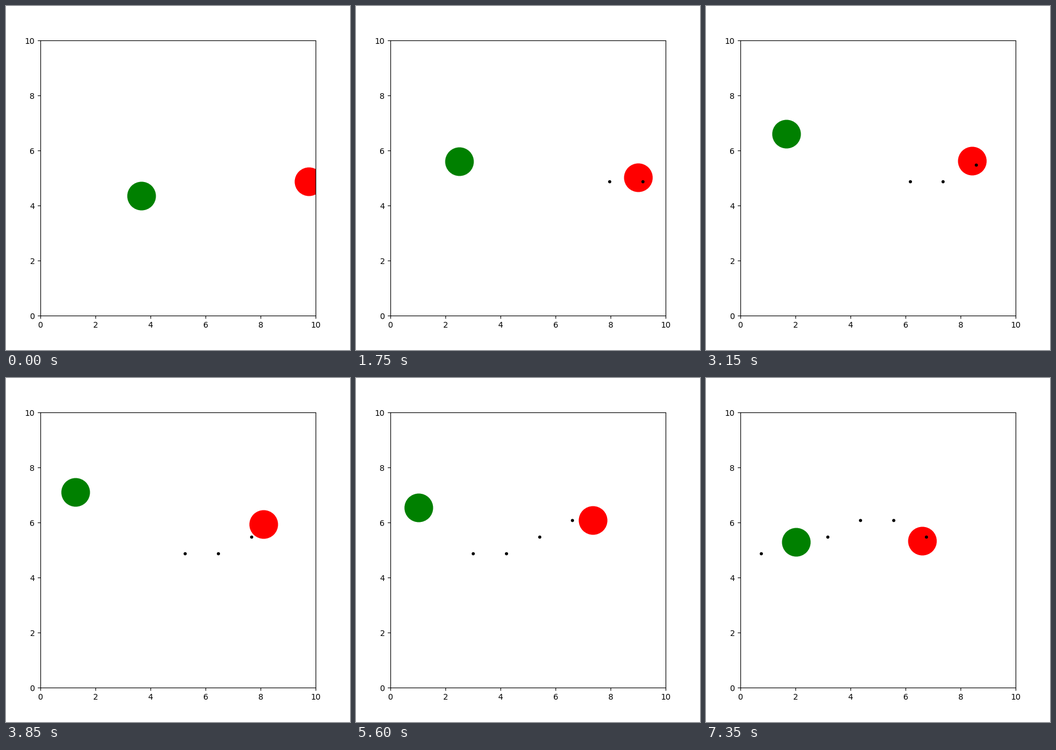
Animation, 600 px wide and 600 px high, one loop 7700 ms. Source, as a matplotlib script:

```python
import numpy as np
import matplotlib.pyplot as plt
from matplotlib.animation import FuncAnimation

FRAMES, INTERVAL = 22, 350
STEP, CLIMB, SHOT_STEP = 0.15, 0.25, 0.45
RELOAD = 4
HIT_RANGE = 0.5
START = np.array([9.758, 4.879])
CEILING = 7.292


def green_pos(k):
    """Climb to the ceiling, then sink, while swerving left and back."""
    x = np.interp(k, [0, 3, 7, 11, 13, 15, 18, 21],
                  [3.667, 2.938, 2.063, 1.271, 1.188, 0.834, 1.396, 2.020])
    y = min(4.355 + CLIMB * k, CEILING, CEILING - CLIMB * (k - 13))
    return np.array([x, y])


def red_pos(k):
    """Drift left at a steady pace, zigzagging down, up and down."""
    rise = np.interp(k, [0, 2, 14, 21], [0, -2, 10, 3])
    return START + STEP * np.array([-k, rise])


def shot_pos(fired, k):
    """Leave from where red fired and fly straight left."""
    return red_pos(fired) - [SHOT_STEP * (k - fired - 1), 0]


def live_shots(k):
    shots = [shot_pos(fired, k) for fired in range(0, k, RELOAD)]
    return [s for s in shots if np.hypot(*(s - green_pos(k))) > HIT_RANGE]


fig = plt.figure(figsize=(6, 6), dpi=100)
ax = fig.add_axes([0.1, 0.1, 0.8, 0.8])
ax.set(xlim=(0, 10), ylim=(0, 10))

green, = ax.plot([], [], "o", color="green", markersize=35)
red, = ax.plot([], [], "o", color="red", markersize=35)
dots, = ax.plot([], [], "o", color="black", markersize=3)


def update(k):
    for line, points in ((green, [green_pos(k)]), (red, [red_pos(k)]),
                         (dots, live_shots(k))):
        line.set_data(*np.reshape(points, (-1, 2)).T)
    return green, red, dots


anim = FuncAnimation(fig, update, frames=FRAMES, interval=INTERVAL,
                     repeat=True, repeat_delay=0)
plt.show()
```
